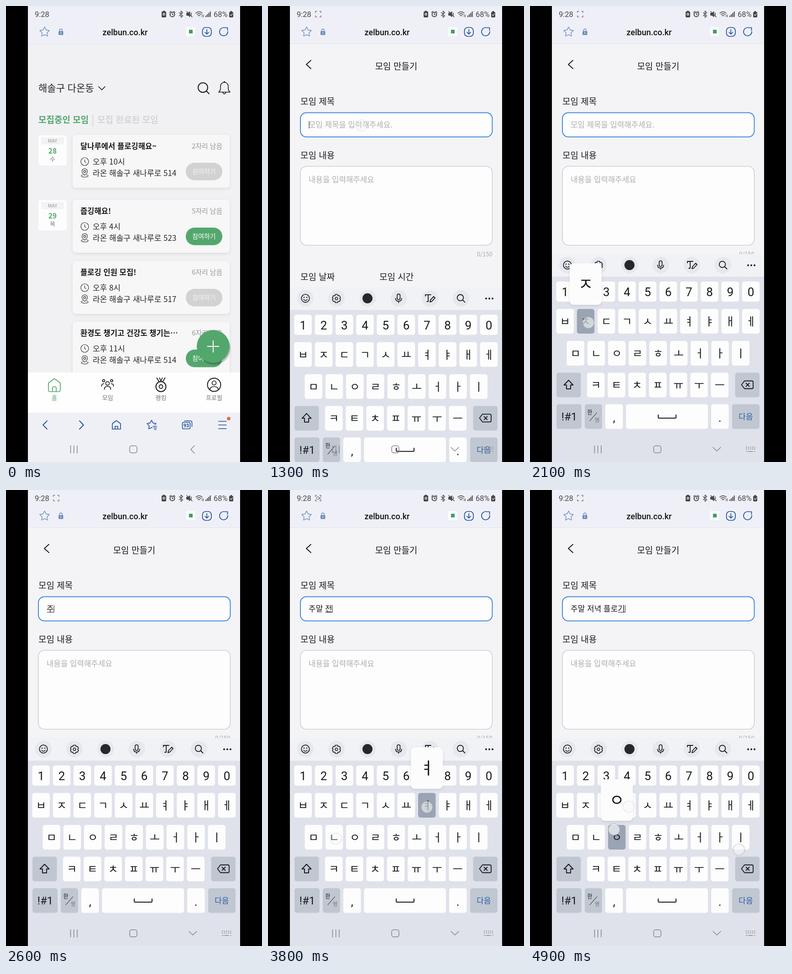
Recreate the animation shown at these times as an HTML page. Size 561 by 998 pixels, loop 5000 ms.

```html
<!DOCTYPE html>
<html lang="ko">
<head>
<meta charset="utf-8">
<style>
html, body { margin: 0; width: 100%; height: 100%; overflow: hidden; background: #000; }
svg { display: block; width: 100vw; height: 100vh; }
text { font-family: "Noto Sans CJK KR", "Noto Sans CJK", sans-serif; white-space: pre; }
text.r { font-family: Roboto, "Open Sans", sans-serif; }
</style>
</head>
<body>
<svg id="stage" viewBox="0 0 561 998"></svg>
<script>
const INK = '#17181a', GREEN = '#53a76d', BLUE = '#1f4f9c', LOOP = 5000;

// Text is placed by its vertical centre.
const text = (x, y, s, size, fill = INK, more = '') =>
  `<text x="${x}" y="${y + size * 0.37}" font-size="${size}" fill="${fill}" ${more}>${s}</text>`;
const MID = 'text-anchor="middle"', END = 'text-anchor="end"', BOLD = 'font-weight="800"';
const box = (x, y, w, h, r, fill, more = '') =>
  `<rect x="${x}" y="${y}" width="${w}" height="${h}" rx="${r}" fill="${fill}" ${more}/>`;
const dot = (x, y, r, fill, more = '') => `<circle cx="${x}" cy="${y}" r="${r}" fill="${fill}" ${more}/>`;
const line = (d, color = INK, w = 1.8, fill = 'none') =>
  `<path d="${d}" fill="${fill}" stroke="${color}" stroke-width="${w}" stroke-linecap="round" stroke-linejoin="round"/>`;
const ring = (x, y, r, color = INK, w = 1.8) => dot(x, y, r, 'none', `stroke="${color}" stroke-width="${w}"`);
const at = (x, y, s) => `<g transform="translate(${x} ${y})">${s}</g>`;

function star(r, color) {
  let d = '';
  for (let i = 0; i < 10; i++) {
    const a = -Math.PI / 2 + i * Math.PI / 5, q = i % 2 ? r * 0.52 : r;
    d += `${i ? 'L' : 'M'}${(q * Math.cos(a)).toFixed(1)} ${(q * Math.sin(a)).toFixed(1)}`;
  }
  return line(d + 'Z', color, 1.6);
}

function statusBar() {
  const g = '#45464a';
  return text(63, 17.5, '9:28', 16.5, g, 'class="r"')
    + box(341, 12, 10, 13, 2, g) + box(343.5, 10.5, 5, 3, 1, g) + ring(346, 18, 2, '#eff0f6', 1.3)
    + ring(364.5, 18.5, 5, g, 2) + line('M364.5 16v3h2M358.5 14l3-2.5M370.500 14l-3-2.500', g, 1.5)
    + line('M379.500 14.500l8 7-4 3.500v-14l4 3.500-8 7', g, 1.4)
    + line('M396 15.500h3l4-3.500v12l-4-3.500h-3z', g, 1, g) + line('M396 12l12 12M406 15v5', g, 1.5)
    + line('M416 15.500q7-6 14 0M418.500 18.500q4.500-4 9 0M421 21.500q2-2 4 0', g, 1.6) + line('M430 19v5M432.500 24v-5', g, 1)
    + [0, 1, 2, 3].map(i => box(437 + i * 3.2, 21 - i * 3, 2, 3 + i * 3, 0, g)).join('')
    + text(455, 17.5, '68%', 16.5, g, 'class="r"')
    + box(489, 13, 9, 12, 2, g) + box(491.5, 11, 4, 3, 1, g) + line('M491.500 19l2 2 3-4', '#eff0f6', 1.2);
}

function addressBar() {
  return box(48, 0, 465, 83, 0, '#eff0f7') + box(48, 82, 465, 1, 0, '#e3e4e9') + statusBar()
    + at(84.5, 57, star(11, '#7d98c6'))
    + box(115, 55, 10.500, 8.500, 1.5, '#6f8dbf') + line('M117.500 55v-2a2.800 2.800 0 0 1 5.600 0v2', '#6f8dbf', 1.5) + box(119.500, 57.500, 1.500, 3, 0, '#fff')
    + text(261, 57, 'zelbun.co.kr', 18, '#141517', `class="r" font-weight="500" ${MID}`)
    + box(394.500, 46, 20, 20, 2, '#fafbfc') + box(401, 52, 8, 8, 0, '#3f9d62')
    + box(430.500, 47, 19.500, 19.500, 7, 'none', `stroke="${BLUE}" stroke-width="1.7"`)
    + line('M440.200 51.500v10M436 57.500l4.200 4 4.200-4', BLUE, 1.7)
    + line('M479 47.500A9 9 0 1 0 486 56M479 47.500h6.500M485.500 47.500v6', BLUE, 1.7);
}

const houseLine = (x, y, color, s = 1) => at(x, y, `<g transform="scale(${s})">`
  + line('M-13-4L-2-12Q0-14 2-12L13-4V11Q13 15 9 15H-9Q-13 15-13 11ZM-4 15V7Q-4 4 0 4Q4 4 4 7V15', color, 1.7 / s) + '</g>');

function browserTools() {
  return box(48, 890, 465, 110, 0, '#eff0f6')
    + line('M90 908l-9 9 9 9', BLUE) + `<g id="forward">${line('M161 908l9 9-9 9', BLUE)}</g>`
    + line('M233 914l9-6.500 9 6.500v12h-18zM239 926v-6h6v6', BLUE, 1.700)
    + at(319, 917, star(10.500, BLUE)) + box(321, 917, 10, 11, 0, '#eff0f6') + line('M322 920h8M324 923.500h6M325 927h4', BLUE, 1.600)
    + line('M391 908h13q3.500 0 3.500 3.500v9', BLUE, 1.600)
    + box(386.500, 911, 17, 14.500, 3, 'none', `stroke="${BLUE}" stroke-width="1.6"`)
    + text(395, 918.500, '93', 10.500, BLUE, `class="r" font-weight="700" ${MID}`)
    + line('M466 909h16.500M466 917h16.500M466 925h16.500', BLUE, 1.700) + dot(488, 903, 3.800, '#de6b35');
}

const clock = (x, y) => ring(x, y, 8.500, '#333', 1.200) + line(`M${x} ${y - 4}v4.500l2.500 1.500`, '#333', 1.200);
const pin = (x, y) => line(`M${x} ${y + 5}q-6-5-6-8.500a6 6 0 0 1 12 0q0 3.500-6 8.500ZM${x - 4} ${y + 4}q-5 1-3 3.500q7 3 14 0q2-2.500-3-3.500`, '#333', 1.200)
  + ring(x, y - 3.500, 2.300, '#333', 1.200);

function card(y, title, left, hour, place, open) {
  return box(146, y - 25, 344, 116, 8, '#f7f7f8', 'filter="url(#soft)"')
    + text(163, y, title, 16.600, INK, BOLD) + text(474, y, left + '자리 남음', 14.800, '#96979a', END)
    + clock(172.500, y + 33.500) + text(190, y + 33.500, '오후 ' + hour + '시', 17, '#27282a')
    + pin(172.500, y + 58.500) + text(190, y + 58.500, place, 17, '#27282a')
    + box(394, y + 36, 80, 38.500, 19.200, open ? GREEN : '#d2d2d3')
    + text(434, y + 55, '참여하기', 14, open ? '#fff' : '#f4f4f4', MID);
}

function date(y, day, name) {
  return box(71, y, 62, 66, 5, '#fdfdfd') + box(77, y + 4, 50, 16, 4, '#f3f3f4')
    + text(102, y + 12, 'MAY', 10.500, '#95969a', MID) + text(102, y + 34.500, day, 15.500, GREEN, BOLD + MID.padStart(22))
    + text(102, y + 52, name, 12.500, '#77787b', MID);
}

function homePage() {
  const road = '라온 해솔구 새나루로 ';
  const person = (x, y, r) => ring(x, y, r, INK, 1.700);
  return box(48, 83, 465, 807, 0, '#f1f1f4')
    + text(71, 179, '해솔구 다온동', 21, '#222') + line('M203 176.500l7 7 7-7', INK, 1.700)
    + ring(431.500, 178.500, 10.500, INK, 2) + line('M439.500 186.500l5.500 5.500', INK, 2)
    + line('M466 188.500q4-3 4-9v-4a8.500 8.500 0 0 1 17 0v4q0 6 4 9zM475 189q3.500 7 7 0M477 166.500q1.500-2 3 0', INK, 1.600)
    + text(71, 249, '모집중인 모임', 19, GREEN, BOLD) + box(189.500, 237, 1.500, 27, 0, '#d2d2d5')
    + text(200, 249, '모집 완료된 모임', 19.100, '#d5d5d7', BOLD)
    + date(283, 28, '수') + date(425, 29, '목')
    + card(307, '달나루에서 플로깅해요~', 2, 10, road + 514, false)
    + card(449, '줍깅해요!', 5, 4, road + 523, true)
    + card(583, '플로깅 인원 모집!', 6, 8, road + 517, false)
    + card(716, '환경도 챙기고 건강도 챙기는⋯', 6, 11, road + 514, true)
    + dot(456, 749, 36, '#0003', 'filter="url(#soft)"') + dot(454, 745, 36, GREEN) + line('M441.500 745h25M454 732.500v25', '#fff', 2)
    + box(48, 802, 465, 88, 0, '#fefefe')
    + houseLine(106, 829, GREEN)
    + person(222.500, 826, 4) + person(214, 820, 2.500) + person(231.500, 820, 2.500)
    + line('M215.500 839q0-6.500 7-6.500t7 6.500M209.500 832q0-5.500 5-5.500M235.500 832q0-5.500-5-5.500', INK, 1.700)
    + ring(339.500, 833, 11, INK, 2) + ring(339.500, 833, 4, INK, 1.800) + line('M330.500 814l5 8M348.500 814l-5 8M336.500 814l3 7 3-7', INK, 1.800)
    + ring(456, 829, 14.500, INK, 1.900) + ring(456, 825, 4.500, INK, 1.700) + line('M447 838.500q1-5.500 9-5.500t9 5.500', INK, 1.700)
    + ['홈', '모임', '랭킹', '프로필'].map((s, i) => text(106 + i * 116.700, 857, s, 13, i ? '#707174' : GREEN, MID)).join('');
}

function formPage() {
  const field = (x, y, w, h, hint = '', size = 17) => box(x, y, w, h, 13, '#fdfdfe', 'stroke="#bcbdc0" stroke-width="1.1"')
    + text(x + 18.500, y + 26, hint, size, '#adaeb1');
  const label = (x, y, s) => text(x, y, s, 19, '#1c1d1f');
  return box(48, 83, 465, 807, 0, '#f4f4f6')
    + line('M94 119l-10 9 10 9', INK, 1.900) + text(281, 132, '모임 만들기', 19, INK, MID)
    + label(71, 209, '모임 제목') + box(71, 233.500, 420.500, 53, 13, '#fdfdfe', 'id="title" stroke="#bcbdc0"')
    + `<g id="hint">${text(89, 259.500, '모임 제목을 입력해주세요.', 16.800, '#adaeb1')}</g>`
    + '<text id="typed" x="89" y="265.500" font-size="17" fill="#17181a"></text>'
    + '<path id="caret" stroke="#333" stroke-width="1.1"/><path id="under" stroke="#333" stroke-width="1.1"/>'
    + label(71, 327, '모임 내용') + field(71, 351, 420.500, 172.500)
    + text(89, 380, '내용을 입력해주세요', 16.800, '#adaeb1') + text(491.500, 543, '0/150', 12.800, '#a6a7aa', END)
    + label(71, 593, '모임 날짜') + field(71, 617, 144.500, 53.500, '4월 30일(수)', 17.700)
    + label(244, 593, '모임 시간') + field(243.500, 617, 144.500, 53.500, '오후 7:00', 17.700)
    + label(71, 711, '모임 장소') + field(71, 735, 420.500, 53.500, '장소를 지정해주세요', 16.800)
    + label(71, 828.500, '최대인원') + ring(155, 829, 8.500, '#777', 1.300) + line('M155 824.500v5M155 833v.1', '#666', 1.500)
    + field(71, 852.500, 121, 53) + text(200, 878, '명', 18)
    + label(245, 828.500, '참여 신청 마감') + field(245.500, 852.500, 223.500, 53) + line('M430.500 876l7 7 7-7', INK, 1.900);
}

const keys = {};
const rows = [
  [57.500, 603, 44, '1234567890'], [57.500, 663, 54, 'ㅂㅈㄷㄱㅅㅛㅕㅑㅐㅔ'],
  [80.500, 733, 54, 'ㅁㄴㅇㄹㅎㅗㅓㅏㅣ'], [125, 802.500, 54, 'ㅋㅌㅊㅍㅠㅜㅡ']
];
rows.forEach(([x, y, h, set]) => [...set].forEach((c, i) => keys[c] = { x: x + i * 45.250, y, w: 38.500, h }));
keys[','] = { x: 165, y: 871.500, w: 38.500, h: 54 };
keys[' '] = { x: 210.500, y: 871.500, w: 179.500, h: 54 };
keys['.'] = { x: 397, y: 871.500, w: 38.500, h: 54 };

function key(c, fill = '#fdfdfe') {
  const k = keys[c], mx = k.x + k.w / 2, my = k.y + k.h / 2;
  const cap = c === ' ' ? line('M281 895v5q0 2 2 2h35q2 0 2-2v-5', INK, 2)
    : /[\d,.]/.test(c) ? text(mx, my + (k.y > 870 ? 2 : .5), c, 26, INK, `class="r" ${MID}`)
    : text(mx, my, c, 24, INK, `font-weight="500" ${MID}`);
  return box(k.x, k.y, k.w, k.h, 5, fill) + cap;
}

function keyboard() {
  const gray = '#c0c7d1';
  let s = box(48, 543, 465, 460, 0, '#dfe2ea') + box(48, 543, 465, 49.500, 0, '#f1f2f6');
  for (let i = 0; i < 6; i++) s += dot(82 + i * 68.200, 567, 18, '#e6e8ed');
  s += ring(82, 567, 8.800, INK, 1.700) + dot(79, 565, 1.300, INK) + dot(85, 565, 1.300, INK) + line('M78 569.500q4 4.500 8 0', INK, 1.500)
    + line('M147.500 558.500h5l1 3 3-.5 2.500 4.500-2 2 2 2-2.500 4.500-3-.5-1 3h-5l-1-3-3 .5-2.500-4.500 2-2-2-2 2.500-4.500 3 .5z', INK, 1.600) + ring(150, 567.500, 2.800, INK, 1.500)
    + dot(218, 567, 11, '#26272a')
    + box(283, 557.500, 6.500, 12.500, 3.200, 'none', `stroke="${INK}" stroke-width="1.7"`) + line('M279.500 567q0 6.500 6.700 6.500t6.700-6.500M286.200 573.500v3', INK, 1.700)
    + line('M345 562v-3h12M351 559v15h-3M355 575l1-4.500 7-7.500 3 3-7 7.500z', INK, 1.800)
    + ring(421.500, 565.500, 6.800, INK, 1.800) + line('M426.500 570.500l5 5', INK, 1.800)
    + [478, 485, 492].map(x => dot(x, 567.500, 2, INK)).join('');
  for (const c in keys) s += key(c);
  return s + box(58, 802.500, 53.500, 54, 5, gray) + line('M84.500 819l10 10.500h-5.500v8.500h-9v-8.500h-5.500z', INK, 1.900)
    + box(449.500, 802.500, 53.500, 54, 5, gray) + line('M470 820.500h16q3 0 3 3v11q0 3-3 3h-16l-6.500-8.500zM473.500 825.500l7 7M480.500 825.500l-7 7', INK, 1.800)
    + box(58, 871.500, 55, 54, 5, gray) + text(86, 898.500, '!#1', 24, INK, `class="r" ${MID}`)
    + box(120, 871.500, 38, 54, 5, gray) + text(131, 889.500, '한', 12, INK, MID) + line('M131 908l15.500-18', '#333', 1.100) + text(147, 907, '영', 12, '#77797e', MID)
    + box(443, 871.500, 60, 54, 5, gray) + text(473, 898.500, '다음', 17, '#2a5da8', MID);
}

function popup(c) {
  const k = keys[c], mx = k.x + k.w / 2, top = k.y - 100;
  return key(c, '#9aa4b4') + (c === ' ' ? '' : box(mx - 35, top, 70, 91, 9, '#fcfcfd', 'filter="url(#soft)"')
    + text(mx, top + 46, c, 36, INK, `font-weight="500" ${MID}`));
}

// Finger contacts: time, key, offset from the key centre.
const presses = [
  [2000, 'ㅈ', 6, 3], [2160, 'ㅜ', 0, 2], [2640, 'ㅁ', 4, 5], [2840, 'ㅏ', 3, 4], [3010, 'ㄹ', -8, 0],
  [3130, ' ', 72, -1], [3280, 'ㅈ', 9, -2], [3400, 'ㅓ', 2, 4], [3540, 'ㄴ', 4, 3], [3680, 'ㅕ', 0, 4],
  [3820, 'ㄱ', 5, 2], [3930, ' ', 47, 10], [4050, 'ㅍ', -13, 0], [4150, 'ㅡ', 0, 0], [4290, 'ㄹ', -6, 0],
  [4410, 'ㄹ', -6, 2], [4520, 'ㅗ', 2, 2], [4630, 'ㄱ', 4, 3], [4740, 'ㅣ', -4, 27], [4850, 'ㅇ', -6, -17]
];
const taps = presses.map(([t, c, dx, dy]) => {
  const k = keys[c];
  return [t, k.x + k.w / 2 + dx, k.y + k.h / 2 + dy];
}).concat([[250, 453, 748], [1020, 205, 261]]);
const drafts = ['ㅈ', '주', '줌', '주마', '주말', '주말 ']
  .concat(['ㅈ', '저', '전', '저녀', '저녁', '저녁 '].map(s => '주말 ' + s))
  .concat(['ㅍ', '프', '플', '플ㄹ', '플로', '플록', '플로기'].map(s => '주말 저녁 ' + s));

const bars = '#85868b';
const stage = document.getElementById('stage');
stage.innerHTML = '<defs><clipPath id="phone"><rect x="48" width="465" height="998"/></clipPath>'
  + '<filter id="soft" x="-20%" y="-20%" width="140%" height="150%"><feDropShadow dx="0" dy="2" stdDeviation="3" flood-color="#000" flood-opacity=".1"/></filter></defs>'
  + '<rect width="561" height="998"/><g clip-path="url(#phone)">'
  + `<g id="home">${homePage()}</g><g id="form">${formPage()}</g>` + addressBar()
  + `<g id="mark">${line('M107 11.500h-3v3M113 11.500h3v3M104 21v3h3M116 21v3h-3', '#55565a', 1.200)}</g>`
  + `<g id="cam">${box(106.500, 15, 5.500, 5.500, 1, 'none', 'stroke="#55565a"')}${line('M112 17.800l2.500-2v4z', '#55565a', .8)}</g>`
  + browserTools() + `<g id="board">${keyboard()}</g>`
  + line('M141.500 962.500v16M148.700 962.500v16M156 962.500v16', bars, 1.500)
  + box(271, 962.500, 16, 15.500, 4.500, 'none', `stroke="${bars}" stroke-width="1.5"`)
  + `<g id="back">${line('M413 962l-8 8.500 8 8.500', bars, 1.500)}</g>`
  + `<g id="hide">${line('M401 966l8.500 8 8.500-8', bars, 1.500)}${line('M474 965.500h19M474 969.500h19', bars, 1.800).replace('/>', ' stroke-dasharray=".5 4"/>')}${line('M474 975h2M479 975h9M492 975h1', bars, 1.600)}</g>`
  + '<g id="touch"></g></g>';

const el = {};
stage.querySelectorAll('[id]').forEach(n => el[n.id] = n);
const show = (n, on) => n.setAttribute('display', on ? 'inline' : 'none');

function draw(t) {
  const form = t >= 500, focus = t >= 1200;
  show(el.home, !form);
  show(el.form, form);
  el.forward.setAttribute('opacity', form ? .4 : 1);
  show(el.mark, t >= 300);
  show(el.cam, t >= 3200 && t < 4500);

  const rise = Math.min(1, Math.max(0, (t - 1150) / 250));
  el.board.setAttribute('transform', `translate(0 ${455 * (1 - rise) ** 2})`);
  show(el.board, rise > 0);
  show(el.back, rise < .5);
  show(el.hide, rise >= .5);

  el.title.setAttribute('stroke', focus ? '#458be0' : '#bcbdc0');
  el.title.setAttribute('stroke-width', focus ? 2 : 1.1);
  const count = presses.filter(p => t >= p[0] + 140).length;
  const draft = count ? drafts[Math.min(count, drafts.length) - 1] : '';
  el.typed.textContent = draft.replace(/ /g, '\u00a0');
  show(el.hint, !draft);
  const x = 89.500 + (draft ? el.typed.getComputedTextLength() : .5);
  const edit = count ? presses[count - 1][0] + 140 : 1200;
  el.caret.setAttribute('d', `M${x} 252v16`);
  show(el.caret, focus && (t - edit) % 1000 < 500);
  el.under.setAttribute('d', `M${x - 15.500} 267.500H${x}`);
  show(el.under, draft && !draft.endsWith(' '));

  let s = presses.filter(p => t >= p[0] + 40 && t < p[0] + 140).map(p => popup(p[1])).join('');
  for (const [start, px, py] of taps) {
    const age = t - start;
    if (age >= 0 && age < 350)
      s += dot(px, py, 12.500, '#f4f5f8', `fill-opacity=".75" stroke="#a9adb6" stroke-width="1.2" opacity="${1 - (age / 350) ** 1.500}"`);
  }
  el.touch.innerHTML = s;
}

const begin = performance.now();
function tick() {
  const t = (performance.now() - begin) % LOOP;
  draw(Math.floor(t / 100) * 100);
  requestAnimationFrame(tick);
}
tick();
</script>
</body>
</html>
```
